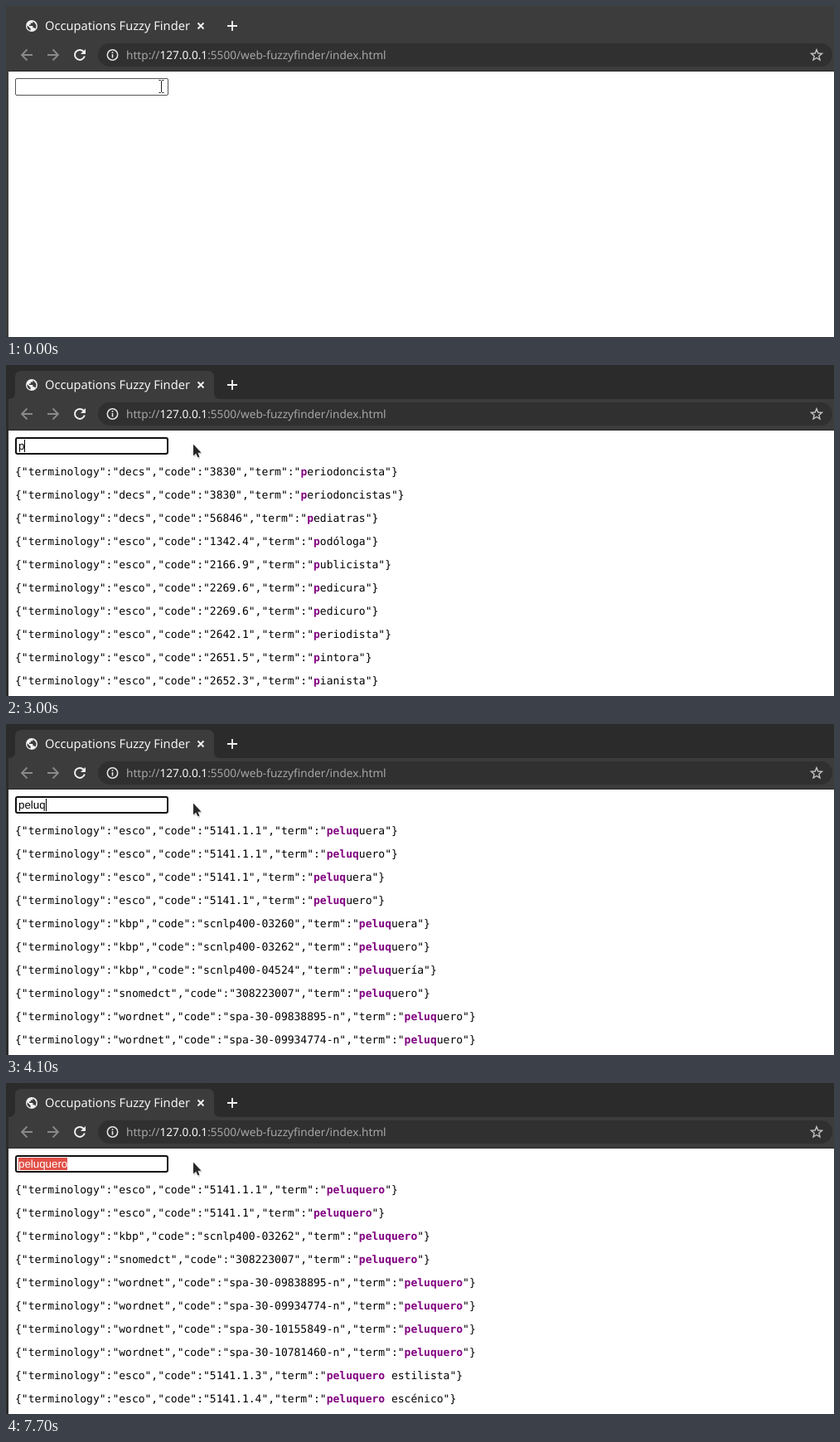
Write an HTML page that moves like this. It is 999x399 px and loops after 8000 ms.

```html
<!DOCTYPE html>
<html lang="en">
<head>
<meta charset="utf-8">
<title>Fuzzy finder</title>
<style>
html, body { margin: 0; width: 100%; height: 100%; overflow: hidden; background: #fff; text-rendering: geometricPrecision; }
#stage { position: relative; width: 999px; height: 399px; overflow: hidden; }
#stage > * { position: absolute; box-sizing: border-box; }
#chrome, #pointer { left: 0; top: 0; }
#chrome text { font: 14.65px "Noto Sans", "Open Sans", sans-serif; font-variant-ligatures: none; fill: #f4f4f4; }
#chrome .url { font-size: 13.63px; fill: #a6a6a6; }
#field { left: 11px; top: 87px; width: 185px; height: 21px; border: 1px solid #555; border-radius: 2px; }
#field.focus { border: 2px solid #101010; border-radius: 3px; }
#typed { left: 15px; top: 90px; font: 13.333px/15px "Liberation Sans", Arial, sans-serif; white-space: pre; }
#typed i { font-style: normal; color: #fff; background: #e04f46; }
#caret { top: 90px; width: 1px; height: 15px; background: #000; }
#list { left: 11px; top: 122px; }
pre { margin: 0 0 13px; font: 13px/15px "DejaVu Sans Mono", monospace; color: #000; }
pre b { color: purple; }
</style>
</head>
<body>
<div id="stage">
  <svg id="chrome" width="999" height="399" fill="none">
    <path id="frame" d="M0 0H999V79H3V399H0Z"/>
    <path fill="#3c3c3c" d="M3 41Q11 41 11 33V15Q11 7 19 7H243Q251 7 251 15V33Q251 41 259 41H999V78H3Z"/>
    <path fill="#272727" d="M3 78H999V79H3Z"/>
    <rect x="111" y="45" width="886" height="28" rx="14" fill="#303030"/>
    <circle cx="31" cy="24" r="7" fill="#f1f1f1"/>
    <path fill="#3c3c3c" d="M25.6 23.2L29.6 27.2V29.6Q25 28.2 25.6 23.2ZM32.4 18.5V20.5H29.8V22.6H28V24H32.4V26.3H34.2L35.5 27.8Q38.4 22 32.4 18.5Z"/>
    <path stroke="#f1f1f1" stroke-width="1.8" d="M231.5 20.5L238.5 27.5M238.5 20.5L231.5 27.5M267 24H279M273 18V30"/>
    <g stroke="#8a8a8a" stroke-width="1.8">
      <path d="M32 59H19.5M25.5 52.5L19 59L25.5 65.5"/>
      <path d="M50 59H62.5M56.5 52.5L63 59L56.5 65.5"/>
    </g>
    <path stroke="#f1f1f1" stroke-width="2" d="M93.6 55A6 6 0 1 0 94.8 60.5"/>
    <path fill="#f1f1f1" d="M96 52V58H90Z"/>
    <circle cx="128.5" cy="59" r="6.2" stroke="#e8e8e8" stroke-width="1.5"/>
    <path stroke="#e8e8e8" stroke-width="1.6" d="M128.5 58V62.5M128.5 55.3V56.9"/>
    <path id="star" stroke="#c4c4c4" stroke-width="1.4"/>
    <text x="47" y="29">Occupations Fuzzy Finder</text>
    <text class="url" x="145" y="64">http://<tspan fill="#f8f8f8">127.0.0.1</tspan>:5500/web-fuzzyfinder/index.html</text>
  </svg>
  <div id="field"></div>
  <div id="typed"></div>
  <div id="caret"></div>
  <div id="list"></div>
  <svg id="pointer" width="999" height="399">
    <path id="beam" fill="none" stroke="#222" transform="translate(187.5 97)" d="M-3 -7.5H-1L0 -6.5L1 -7.5H3M0 -6.5V6.5M-3 7.5H-1L0 6.5L1 7.5H3"/>
    <g id="arrow">
      <path opacity=".15" transform="translate(.8 1.8)" d="M0 0V14.5L3.3 11.5L5.5 16.3L7.8 15.2L5.6 10.5H10Z"/>
      <path fill="#272727" d="M0 0V14L3.2 11L5.4 15.8L7.4 14.9L5.3 10.2H9.6Z"/>
    </g>
  </svg>
</div>
<script>
const $ = id => document.getElementById(id);

const results = {
  p: `decs 3830 periodoncista
decs 3830 periodoncistas
decs 56846 pediatras
esco 1342.4 podóloga
esco 2166.9 publicista
esco 2269.6 pedicura
esco 2269.6 pedicuro
esco 2642.1 periodista
esco 2651.5 pintora
esco 2652.3 pianista`,
  pe: `decs 3830 periodoncista
decs 3830 periodoncistas
decs 56846 pediatras
esco 2269.6 pedicura
esco 2269.6 pedicuro
esco 2642.1 periodista
esco 2652.3 percusionista
esco 3211.1 perfusionista
esco 3521.1.2 perchista
esco 5141.1.1 peluquera`,
  pel: `esco 5141.1.1 peluquera
esco 5141.1.1 peluquero
esco 5141.1 peluquera
esco 5141.1 peluquero
esco 7531.6 peletera
esco 7531.6 peletero
kbp scnlp400-03260 peluquera
kbp scnlp400-03262 peluquero
kbp scnlp400-04524 peluquería
snomedct 308223007 peluquero`,
  peluq: `esco 5141.1.1 peluquera
esco 5141.1.1 peluquero
esco 5141.1 peluquera
esco 5141.1 peluquero
kbp scnlp400-03260 peluquera
kbp scnlp400-03262 peluquero
kbp scnlp400-04524 peluquería
snomedct 308223007 peluquero
wordnet spa-30-09838895-n peluquero
wordnet spa-30-09934774-n peluquero`,
  peluquero: `esco 5141.1.1 peluquero
esco 5141.1 peluquero
kbp scnlp400-03262 peluquero
snomedct 308223007 peluquero
wordnet spa-30-09838895-n peluquero
wordnet spa-30-09934774-n peluquero
wordnet spa-30-10155849-n peluquero
wordnet spa-30-10781460-n peluquero
esco 5141.1.3 peluquero estilista
esco 5141.1.4 peluquero escénico`
};

// value in force at time t, from [start, value] pairs
const at = (steps, t) => steps.filter(s => s[0] <= t).pop()[1];

const queries = [[0, ""], [3000, "p"], [3400, "pe"], [3700, "pel"], [4100, "peluq"], [5200, "peluquero"]];
const carets = [[0, 0], [800, 1], [1500, 0], [2000, 1], [5800, 0], [6400, 1], [7500, 0]];
const selected = [[0, 0], [7500, 3], [7600, 6], [7700, 9]];
const arrowX = [[0, 0], [1100, 205], [1200, 219], [1300, 226]];

function row(line, query) {
  const [source, code, ...term] = line.split(" ");
  const rest = term.join(" ").slice(query.length);
  return `<pre>{"terminology":"${source}","code":"${code}","term":"<b>${query}</b>${rest}"}</pre>`;
}

const star = Array.from({ length: 10 }, (_, i) => {
  const a = i * Math.PI / 5, r = i % 2 ? 3 : 6.8;
  return `${978 + r * Math.sin(a)} ${59.5 - r * Math.cos(a)}`;
});
$("star").setAttribute("d", `M${star.join("L")}Z`);

let shown;
function draw(t) {
  const focus = t >= 800, query = at(queries, t), x = at(arrowX, t);
  const caret = at(carets, t), cut = query.length - at(selected, t);
  const state = [focus, query, x, caret, cut].join();
  if (state === shown) return;
  shown = state;

  $("frame").setAttribute("fill", focus ? "#2b2b2b" : "#3c3c3c");
  $("field").className = focus ? "focus" : "";
  $("typed").innerHTML = `${query.slice(0, cut)}<i>${query.slice(cut)}</i>`;
  $("caret").style.left = 15 + Math.round($("typed").getBoundingClientRect().width) + "px";
  $("caret").style.opacity = caret;
  $("list").innerHTML = query && results[query].split("\n").map(line => row(line, query)).join("");
  $("beam").style.display = x ? "none" : "";
  $("arrow").style.display = x ? "" : "none";
  $("arrow").setAttribute("transform", `translate(${x} 95.5)`);
}

const start = performance.now();
function tick() {
  draw((performance.now() - start) % 8000);
  requestAnimationFrame(tick);
}
tick();
</script>
</body>
</html>
```
